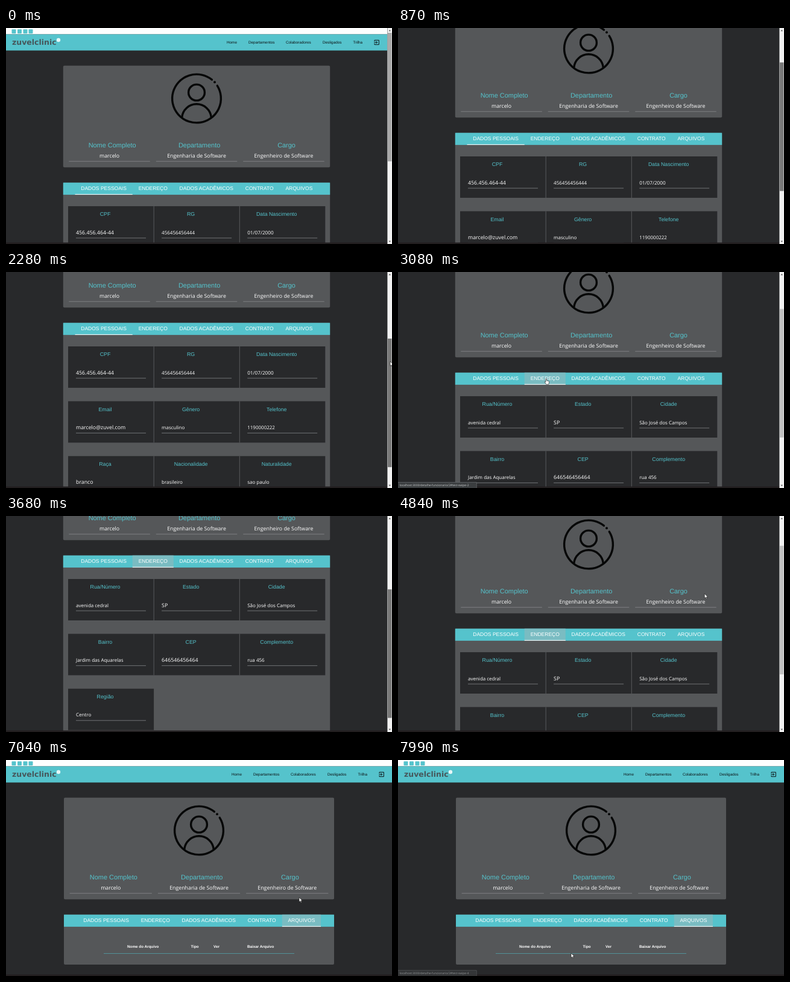
An HTML page for the animation above (8040 ms loop, 640 by 360 pixels).

```html
<!DOCTYPE html>
<html lang="pt-BR">
<head>
<meta charset="utf-8">
<title>Detalhe do colaborador</title>
<style>
  html, body { margin: 0; width: 100%; height: 100%; overflow: hidden; background: #28292b; }
  svg { display: block; width: 640px; height: 360px; }
  text { text-rendering: geometricPrecision; fill: #fff; }
  .arial { font-family: "Liberation Sans", Arial, sans-serif; }
  .open { font-family: "Open Sans", "Noto Sans", sans-serif; }
  .logo { font: bold 12.5px "DejaVu Sans", sans-serif; fill: #46575b; }
  .nav { font-size: 6.35px; fill: #0c1214; }
  .cyan { fill: #55c3cc; }
</style>
</head>
<body>
<svg id="stage" viewBox="0 0 640 360"></svg>
<script>
const LOOP = 8040, STEP = 50, VIEW = 360;
const CYAN = '#55c3cc', CARD = '#555759', DARK = '#28292b', RULE = '#909395';
const stage = document.getElementById('stage');

function add(parent, tag, attrs = {}, text) {
  const el = document.createElementNS('http://www.w3.org/2000/svg', tag);
  for (const k in attrs) el.setAttribute(k, attrs[k]);
  if (text) el.textContent = text;
  parent.appendChild(el);
  return el;
}
const rect = (p, x, y, width, height, fill, rx = 0) => add(p, 'rect', { x, y, width, height, fill, rx });
const rule = (p, x, y, w, stroke = RULE) =>
  add(p, 'path', { d: `M${x} ${y}h${w}`, stroke, 'stroke-width': .7 });
const label = (p, x, y, size, text, cls = 'arial', anchor = 'middle') =>
  add(p, 'text', { x, y, 'font-size': size, class: cls, 'text-anchor': anchor }, text);
const show = (el, on) => el.setAttribute('display', on ? 'inline' : 'none');

// Tabs: name, left edge and right edge in the narrow layout
const TABS = [
  ['DADOS PESSOAIS', 114.5, 209.7], ['ENDEREÇO', 209.7, 277.8],
  ['DADOS ACADÊMICOS', 277.8, 386.7], ['CONTRATO', 386.7, 453.8], ['ARQUIVOS', 453.8, 518]
];

// Fields per tab: label, value, value size
const FIELDS = [
  [['CPF', '456.456.464-44', 8.8], ['RG', '456456456444', 8], ['Data Nascimento', '01/07/2000', 8.2],
   ['Email', 'marcelo@zuvel.com', 8.8], ['Gênero', 'masculino', 8], ['Telefone', '1190000222', 8],
   ['Raça', 'branco', 8.8], ['Nacionalidade', 'brasileiro', 8], ['Naturalidade', 'sao paulo', 8]],
  [['Rua/Número', 'avenida cedral', 8], ['Estado', 'SP', 8.8], ['Cidade', 'São José dos Campos', 8],
   ['Bairro', 'Jardim das Aquarelas', 8], ['CEP', '646546456464', 8.8], ['Complemento', 'rua 456', 8],
   ['Região', 'Centro', 8]],
  [['Formação', 'Engenheiro de Software', 7.9], ['Curso', 'Desenvolvimento De Softwa', 8.8],
   ['Idiomas', 'Português e Inglês', 8]],
  [['Departamento', 'Engenharia de Software', 7.9], ['Cargo', 'Engenheiro de Software', 7.9]]
];
const MAX_SCROLL = [218, 218, 35.5, 35.5, 0];

function header(p, W) {
  const dx = W - 632;
  rect(p, 0, 0, W, 10.5, '#fdfefe');
  [9.5, 19, 28.5, 37.5].forEach(x => rect(p, x, 2.3, 7, 7, CYAN, 1));
  rect(p, 0, 10.5, W, 27, CYAN);
  add(p, 'text', { x: 10, y: 27.5, class: 'logo' }, 'zuvelclinic');
  add(p, 'circle', { cx: 87, cy: 20, r: 3.2, fill: '#e6f6f7' });
  [['Home', 366], ['Departamentos', 402], ['Colaboradores', 464], ['Desligados', 525], ['Trilha', 575.5]]
    .forEach(([s, x]) => label(p, x + dx, 26.2, 6.35, s, 'arial nav', 'start'));
  add(p, 'path', {
    d: `M${611 + dx} 22.3v-2h7.3v7.4h-7.3v-2M${610.3 + dx} 24h5.2m-1.9-2l2 2l-2 2`,
    fill: 'none', stroke: '#0c1214', 'stroke-width': 1
  });
}

function profile(p, W) {
  const cx = W / 2, w = W * .7, pitch = w * .3265, half = w * .152;
  rect(p, cx - w / 2, 62.7, w, 169.5, CARD, 2);
  const face = add(p, 'g', { fill: 'none', stroke: '#060707', 'stroke-width': 3.4, 'stroke-linecap': 'round',
    transform: `translate(${cx} 117.5)` });
  const at = deg => [40.4 * Math.cos(deg * Math.PI / 180), 40.4 * Math.sin(deg * Math.PI / 180)].join(' ');
  add(face, 'path', { d: `M${at(-32)}A40.4 40.4 0 1 1 ${at(-51)}` });
  add(face, 'circle', { cx: 30, cy: -27.3, r: 2, fill: '#060707', stroke: 'none' });
  add(face, 'circle', { cx: 0, cy: -10, r: 13.4 });
  add(face, 'path', { d: 'M-24.3 31.5a24.4 24.4 0 0 1 48.6 0' });
  [['Nome Completo', 'marcelo'], ['Departamento', 'Engenharia de Software'], ['Cargo', 'Engenheiro de Software']]
    .forEach(([name, value], i) => {
      const x = cx + (i - 1) * pitch;
      label(p, x + 4.6, 199, 10.95, name, 'arial cyan');
      label(p, x, 216.2, 8.8, value, 'open');
      rule(p, x - half, 222.2, half * 2);
    });
}

function fields(p, list) {
  list.forEach(([name, value, size], i) => {
    const col = i % 3, x = 103 + col * 142.1, y = 297 + Math.floor(i / 3) * 91.4;
    rect(p, x, y, 142.1, 69, DARK);
    if (col) rect(p, x - .4, y, .8, 69, '#626567');
    label(p, x + 61.5, y + 16.2, 8.8, name, 'arial cyan');
    label(p, x + 13, y + 46.6, size, value, 'open', 'start');
    rule(p, x + 13, y + 53, 116);
  });
}

function files(p) {
  [['Nome do Arquivo', 227.2], ['Tipo', 313], ['Ver', 349], ['Baixar Arquivo', 422.2]]
    .forEach(([s, x]) => label(p, x, 312.6, 6.3, s).setAttribute('font-weight', 'bold'));
  rule(p, 162, 322.5, 316, '#4fabb4');
}

function buildPage(tab) {
  const W = tab === 4 ? 640 : 632, w = W * .7, left = (W - w) / 2, dx = (W - 632) / 2;
  const page = add(stage, 'g');
  header(page, W);
  profile(page, W);
  const rows = tab < 4 ? Math.ceil(FIELDS[tab].length / 3) : 0;
  const bottom = rows ? 389 + (rows - 1) * 91.4 : 341;
  rect(page, left, 257.7, w, bottom - 257.7, CARD, 2);
  rect(page, left, 257.7, w, 20.2, CYAN);
  const [, a, b] = TABS[tab];
  if (tab) rect(page, a + dx, 257.7, b - a, 20.2, '#7abcc2');
  rect(page, a + dx, 276.8, b - a, 1.1, '#f3f8f8');
  TABS.forEach(([s, l, r]) => label(page, (l + r) / 2 + dx, 270.3, 8.5, s));
  if (rows) fields(page, FIELDS[tab]); else files(page);
  return page;
}

rect(stage, 0, 0, 640, 360, DARK);
const pages = TABS.map((_, i) => buildPage(i));

rect(stage, 0, 357.5, 640, 2.5, '#221f20');
const bar = add(stage, 'g');
rect(bar, 632.4, 0, 7.6, 360, '#f1f1f1');
add(bar, 'path', { d: 'M634.5 5.2l1.8-2.2l1.8 2.2zM634.5 354.8l1.8 2.2l1.8-2.2z', fill: '#555' });
const thumb = rect(bar, 633, 8, 6.5, 214, '#a8a8a8');

const status = add(stage, 'g');
rect(status, -1, 350.2, 131.5, 11, '#73777a', 1);
rect(status, -1, 350.8, 130.9, 11, '#3b3e40', 1);
const link = label(status, 2.5, 357.2, 4.9, ' ', 'open', 'start');
link.style.fill = '#c9cccd';

const cursor = add(stage, 'g');
const ink = { fill: '#fff', stroke: '#111', 'stroke-width': .6, 'stroke-linejoin': 'round' };
const arrow = add(cursor, 'path', { ...ink, d: 'M0 0v7.6l1.8-1.6l1.2 2.7l1.2-.5l-1.2-2.6h2.4z' });
const hand = add(cursor, 'path', { ...ink,
  d: 'M-1 0q.8-1 1.6 0v3l3 .7q1 .3 .9 1.5l-.6 4h-4.2l-2.4-3.6q-.2-1.2 1-.8l.7 .7z' });

// Tables of steps: time first, then values
const SCROLL = [[0, 0], [370, 0], [520, 14], [870, 83], [1270, 196], [1470, 218], [2100, 218], [2270, 173],
  [2720, 90], [3320, 90], [3670, 192], [3800, 218], [4220, 218], [4670, 70], [7970, 70]];
const POINTER = [[0, 644, 60], [1470, 644, 189], [2100, 637, 176], [2270, 637, 149], [2720, 637, 100],
  [3020, 246, 178], [3100, 246, 178], [3320, 644, 90], [3670, 644, 151], [3800, 644, 166], [4220, 644, 166],
  [4670, 640, 78], [5000, 335, 197], [5150, 335, 197], [5420, 335, 229], [5720, 335, 229], [6200, 418, 227.5],
  [6450, 418, 227.5], [6850, 486, 229], [7060, 486, 229], [7400, 480, 266], [7770, 480, 266], [7970, 287, 322]];
const TAB_AT = [[0, 0], [3070, 1], [5120, 2], [6420, 3], [7020, 4]];
const DRAGS = [[210, 1500], [2100, 2750], [3320, 4680]];
const LINKS = [1, 2, 3, 4, 4];

function sample(table, t, ease = k => k) {
  const n = table.findIndex(row => row[0] > t);
  if (n < 0) return table[table.length - 1].slice(1);
  const a = table[n - 1], b = table[n], k = ease((t - a[0]) / (b[0] - a[0]));
  return a.slice(1).map((v, i) => v + (b[i + 1] - v) * k);
}
const smooth = k => k * k * (3 - 2 * k);

function draw(time) {
  const t = Math.max(0, Math.floor((time - 20) / STEP) * STEP + 20);
  const tab = TAB_AT.filter(row => row[0] <= t).pop()[1];
  const max = MAX_SCROLL[tab];
  const y = Math.min(sample(SCROLL, t)[0], max);
  pages.forEach((p, i) => show(p, i === tab));
  pages[tab].setAttribute('transform', `translate(0 ${-y})`);

  show(bar, max > 0);
  const size = 344 * VIEW / (VIEW + max);
  const dragging = DRAGS.some(([a, b]) => t >= a && t < b);
  thumb.setAttribute('y', 8 + (max ? y / max * (344 - size) : 0));
  thumb.setAttribute('height', size);
  const near = t < 2800;
  thumb.setAttribute('fill', dragging ? '#787878' : near ? '#a8a8a8' : '#c1c1c1');

  const [cx, cy] = sample(POINTER, t, smooth);
  cursor.setAttribute('transform', `translate(${cx} ${cy})`);
  const dx = tab === 4 ? 4 : 0;
  const inBar = cy + y > 257 && cy + y < 278;
  const over = inBar ? TABS.findIndex(([, l, r]) => cx >= l + dx && cx < r + dx) : -1;
  show(hand, over >= 0);
  show(arrow, over < 0);

  const leaving = t > 7770;
  show(status, over >= 0 || leaving);
  status.setAttribute('opacity', leaving ? .65 : 1);
  const target = leaving ? 4 : over;
  if (target >= 0) link.textContent = `localhost:3000/detalhe-funcionario/2#test-swipe-${LINKS[target]}`;
}

const start = performance.now();
function tick() {
  draw((performance.now() - start) % LOOP);
  requestAnimationFrame(tick);
}
tick();
</script>
</body>
</html>
```
